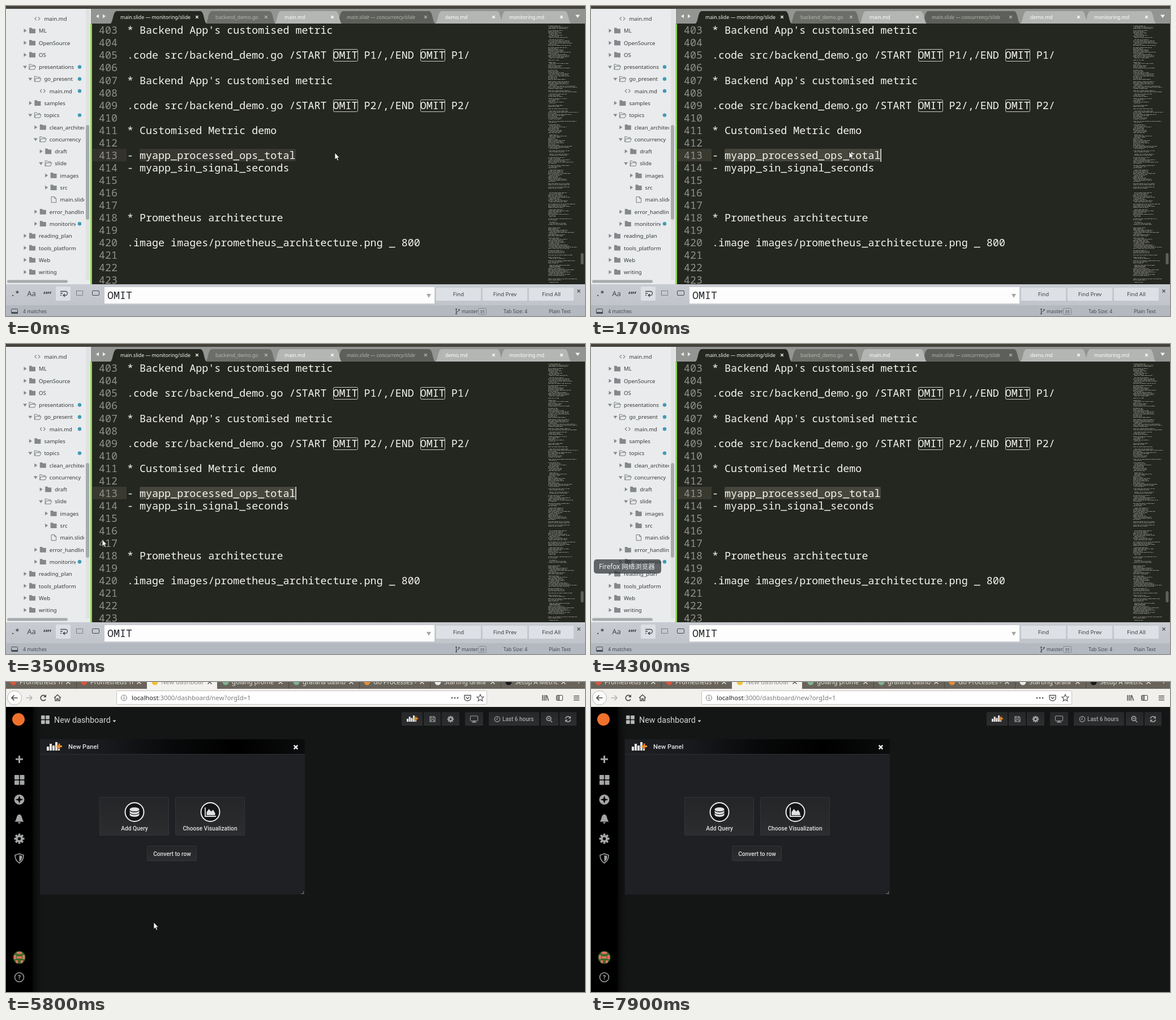
Animation, 1023 px wide and 547 px high, one loop 8 s. Source, as an HTML page with a canvas:

```html
<!DOCTYPE html>
<html lang="en">
<head>
<meta charset="utf-8">
<title>Editor to dashboard</title>
<style>
  html, body { margin: 0; width: 100%; height: 100%; overflow: hidden; background: #242620; }
  canvas { display: block; }
</style>
</head>
<body>
<canvas id="stage" width="1023" height="547"></canvas>
<script>
const g = document.getElementById('stage').getContext('2d');
const LOOP = 8000, SWITCH = 4400;
const UI = '"Noto Sans", sans-serif', WEB = 'Roboto, sans-serif';
const CODE = '18.37px "Noto Sans Mono", monospace';
const CHAR = 11.02, ROW = 22.05, TEXT_X = 214;

// ---- drawing helpers ----
function text(s, x, y, font, color, align = 'left') {
  g.font = font; g.fillStyle = color; g.textAlign = align;
  g.fillText(s, x, y);
}
function rect(x, y, w, h, color) { g.fillStyle = color; g.fillRect(x, y, w, h); }
function shape(d, x, y, fill, stroke, width = 1) {
  g.save(); g.translate(x, y);
  const p = new Path2D(d);
  if (fill) { g.fillStyle = fill; g.fill(p); }
  if (stroke) { g.strokeStyle = stroke; g.lineWidth = width; g.stroke(p); }
  g.restore();
}
function box(x, y, w, h, r, fill, stroke) {
  g.beginPath(); g.roundRect(x, y, w, h, r);
  if (fill) { g.fillStyle = fill; g.fill(); }
  if (stroke) { g.strokeStyle = stroke; g.lineWidth = 1; g.stroke(); }
}
function disc(x, y, r, fill, stroke, width = 1) {
  g.beginPath(); g.arc(x, y, r, 0, 7);
  if (fill) { g.fillStyle = fill; g.fill(); }
  if (stroke) { g.strokeStyle = stroke; g.lineWidth = width; g.stroke(); }
}
function cross(x, y, r, color, width = 1.3) {
  shape(`M${-r} ${-r}L${r} ${r}M${-r} ${r}L${r} ${-r}`, x, y, null, color, width);
}
function gradient(x0, y0, x1, y1, ...colors) {
  const f = g.createLinearGradient(x0, y0, x1, y1);
  colors.forEach((c, i) => f.addColorStop(i / (colors.length - 1), c));
  return f;
}
function randomFrom(seed) {
  return () => (seed = seed * 16807 % 2147483647) / 2147483647;
}

// ---- editor ----
// kind, depth, label, modified: "+" open folder, ">" closed folder, "c" code file, "f" plain file
const tree = [
  'c1 main.md', '>0 ML', '>0 OpenSource', '>0 OS', '+0 presentations *', '+1 go_present *',
  'c2 main.md *', '>1 samples', '+1 topics *', '>2 clean_architecture', '+2 concurrency',
  '>3 draft', '+3 slide', '>4 images', '>4 src', 'f4 main.slide', '>2 error_handling',
  '>2 monitoring *', '>0 reading_plan', '>0 tools_platform', '>0 Web', '>0 writing'
];
const code = [
  "* Backend App's customised metric", '',
  '.code src/backend_demo.go /START OMIT P1/,/END OMIT P1/', '',
  "* Backend App's customised metric", '',
  '.code src/backend_demo.go /START OMIT P2/,/END OMIT P2/', '',
  '* Customised Metric demo', '',
  '- myapp_processed_ops_total', '- myapp_sin_signal_seconds', '', '', '',
  '* Prometheus architecture', '',
  '.image images/prometheus_architecture.png _ 800', '', '', ''
];
// left, right, label, label x, fill, text colour, italic
const tabs = [
  [870, 1000, 'monitoring.md', 889, '#b3b6b3', '#fff'],
  [757, 880, 'demo.md', 776, '#b3b6b3', '#fff'],
  [583, 760, 'main.slide — concurrency/slide', 602, '#5d5f5a', '#b0b2ac', true],
  [473, 595, 'main.md', 492, '#b3b6b3', '#fff'],
  [351, 478, 'backend_demo.go', 370, '#6c6e69', '#b5b7b1'],
  [183, 356, 'main.slide — monitoring/slide', 202, '#242620', '#f4f4f0']
];

function drawSidebar() {
  rect(0, 5, 152, 486, '#e9ebec');
  tree.forEach((entry, i) => {
    const kind = entry[0], [, label, modified] = entry.split(' ');
    const x = 58 + 9.4 * entry[1], y = 22.3 + 21.29 * i;
    if (kind === '>') shape('M-2-3.5L3 0L-2 3.5Z', x - 24.5, y, '#85898c');
    if (kind === '+') shape('M-3.5-2L3.5-2L0 3Z', x - 24.5, y, '#85898c');
    if (kind === '>') shape('M0-5h4l1.5 1.7h5.5v8H0Z', x - 17, y, '#85888b');
    if (kind === '+') shape('M.5 4.5V-4.5H4L5.5-3H10V-1M.5 4.5L2.5-1H12L10 4.5Z', x - 17.5, y, null, '#777b7e');
    if (kind === 'c') shape('M4-3L1 0L4 3M7-3L10 0L7 3', x - 17.5, y, null, '#85888b', 1.2);
    if (kind === 'f') shape('M.5-5H6L9-2V5H.5ZM6-5V-2H9', x - 16, y, null, '#777b7e');
    g.save();
    g.beginPath(); g.rect(0, 0, modified ? 123 : 138, 491); g.clip();
    text(label, x, y + 3.7, '9.6px ' + UI, '#373b3e');
    g.restore();
    if (modified) disc(130, y, 3.2, '#3e9bb5');
  });
  rect(141, 5, 7, 479, '#dfe1e2');
  box(141, 210, 6, 167, 3, '#a7abad');
  box(2, 483.5, 107, 5, 2.5, '#a7abad');
  rect(149, 31, 3, 460, '#8fdb4a');
}

function drawTabs() {
  rect(0, 0, 1023, 5, '#45423c');
  rect(150, 5, 873, 27, '#929592');
  shape('M2-3.5L-3 0L2 3.5Z', 162, 18, '#eceeec');
  shape('M-2-3.5L3 0L-2 3.5Z', 173, 18, '#eceeec');
  for (const [l, r, label, x, fill, color, italic] of tabs) {
    shape(`M${l} 32C${l + 7} 31 ${l + 5} 9 ${l + 13} 9H${r - 13}C${r - 5} 9 ${r - 7} 31 ${r} 32Z`, 0, 0, fill);
    text(label, x, 23.3, (italic ? 'italic ' : '') + '8.75px ' + UI, color);
    cross(r - 18.5, 19.5, 2.3, color);
  }
  rect(152, 31, 871, 1, '#242620');
  shape('M-4-2.5H4L0 3Z', 1010, 18, '#f1f2f1');
}

function drawMinimap(selected) {
  const rand = randomFrom(4207);
  g.fillStyle = 'rgba(216,218,206,.55)';
  for (let y = 33; y < 490; y += 2) {
    if (rand() < .17) continue;
    const isLong = rand() < .16, indent = rand() < .3 ? 2 : 0;
    const end = 958 + (isLong ? 36 + rand() * 17 : 12 + rand() * 27);
    for (let x = 958 + indent; x < end;) {
      const w = Math.min(1 + rand() * 6, end - x);
      g.fillRect(x, y, w, 1);
      x += w + 1;
    }
  }
  if (selected) rect(960, 460, 20, 2, 'rgba(110,109,94,.6)');
  box(1015.5, 436, 5, 20, 2.5, '#5e605a');
}

function drawCode(s) {
  const dim = s.time < 300;
  rect(152, 31, 871, 460, '#242620');
  rect(153, 252, 60, 22, dim ? '#33332b' : '#3a392f');
  if (s.selected) box(236, 252, 276, 22, 2, dim ? '#383831' : '#47463c');
  code.forEach((line, i) => {
    const y = 49.3 + ROW * i;
    text(403 + i, 164, y, CODE, '#8f908a');
    text(line, TEXT_X, y, CODE, '#f5f5ee');
    for (const m of line.matchAll(/OMIT/g))
      box(Math.round(TEXT_X + m.index * CHAR) + .5, Math.round(y - 17) + .5, 43, 21, 2, null, '#c9cac1');
  });
  if (s.caret) rect(s.caret, 252, 1.4, 23, '#f8f8f0');
  drawMinimap(s.selected);
}

function drawFindBar() {
  const ink = '#43484d';
  rect(0, 491, 1023, 37, gradient(0, 491, 0, 528, '#c8ccd2', '#c1c5cb'));
  box(88, 495, 26, 25, 2, '#dce0e4');
  text('.*', 16, 512, 'bold 13px "Noto Sans Mono", monospace', ink, 'center');
  text('Aa', 45, 512, '13px ' + UI, ink, 'center');
  text('“”', 73, 516, 'bold 16px ' + UI, ink, 'center');
  shape('M-6-3.5H3A3.5 3.5 0 0 1 3 3.5H-1M-6 0H-2M-6 3.5H-4M2 1L-1 3.5L2 6', 102, 507, null, ink, 1.3);
  g.setLineDash([2, 1.5]);
  g.strokeStyle = ink; g.lineWidth = 1; g.strokeRect(124.5, 502.5, 11, 8);
  g.setLineDash([]);
  box(152.5, 502.5, 12, 8, 1.5, null, ink);
  rect(174, 496, 583, 29, '#fdfdfd');
  text('OMIT', 179, 517, CODE, '#22252a');
  shape('M-4-3H4L0 4Z', 747, 511, '#a4a7aa');
  ['Find', 'Find Prev', 'Find All'].forEach((label, i) => {
    box(760 + 82 * i, 497, 79, 23, 1, '#dde0e4');
    text(label, 799.5 + 82 * i, 512, '9.6px ' + UI, '#3b4045', 'center');
  });
  cross(1012, 503, 2.5, '#4c5156');
  rect(0, 528, 1023, 19, '#b4b9c1');
  const small = '8.7px ' + UI, color = '#454a51';
  box(9.5, 534.5, 11, 8, 1, null, color);
  rect(10, 540, 11, 3, color);
  text('4 matches', 30, 542, small, color);
  shape('M-2.5-3V4M2.5-2C2.5 1-2.5 0-2.5 3', 798, 538.5, null, color);
  [[795.5, 535], [800.5, 536], [795.5, 543]].forEach(([x, y]) => disc(x, y, 1.3, color));
  text('master', 805, 542, small, color);
  box(834.5, 533.5, 14, 11, 2, null, '#858a91');
  text('35', 841.5, 541.5, '7px ' + UI, color, 'center');
  text('Tab Size: 4', 879, 542, small, color);
  text('Plain Text', 959, 542, small, color);
}

function drawEditor(s) {
  drawCode(s);
  drawSidebar();
  drawTabs();
  drawFindBar();
}

// ---- browser ----
const pages = [
  ['Prometheus Ti', '#e0523a'], ['Prometheus Ti', '#e0523a'], ['New dashboar', '#f2c230'],
  ['golang prome', '#7fb08f'], ['grafana dashb', '#7fb08f'], ['Go Processes -', '#e98a35'],
  ['Starting Grafa', '#e9e9e6'], ['Setup A Metric', '#171717']
];

function drawBrowserBar() {
  const ink = '#4c4c4b';
  rect(0, 0, 1023, 12, '#68645b');
  pages.forEach(([title, color], i) => {
    const x = -1 + 125 * i, active = i === 2;
    if (active) rect(249, 0, 124, 13, '#f3f2ef');
    else if (i !== 3) rect(x, 0, 1, 12, '#4a473f');
    g.save();
    g.beginPath(); g.rect(0, 0, x + 101, 12); g.clip();
    disc(x + 14, 0, 5.5, color);
    text(title, x + 25, 3.7, '11.2px ' + UI, active ? '#8d8b84' : '#e7e4dc');
    g.restore();
    cross(x + 111, 0, 3.5, active ? ink : '#e7e4dc', 1.4);
  });
  text('+', 1012, 4, '13px ' + UI, '#e7e4dc', 'center');
  rect(0, 12, 1023, 32, '#f1f0ed');
  disc(15, 28, 12.5, '#fbfbfa', '#b9b8b5');
  shape('M5.5 0H-5M-.5-4.5L-5 0L-.5 4.5', 15, 28, null, ink, 1.7);
  shape('M-5.5 0H5M.5-4.5L5 0L.5 4.5', 41, 28, null, '#b5b4b1', 1.6);
  shape('M4 2.5A4.7 4.7 0 1 1 3-3.5', 66, 28, null, ink, 1.7);
  shape('M5-6V-1H0Z', 66, 28, ink);
  shape('M-6 0L0-5.5L6 0M-4-1V5H-1.2V1.5H1.2V5H4V-1', 91, 28, null, ink, 1.5);
  box(195.5, 15.5, 654, 24, 2, '#fff', '#c6c4bf');
  disc(208.5, 28, 5, null, '#757575');
  rect(208, 27, 1.2, 4, '#757575'); rect(208, 25, 1.2, 1.2, '#757575');
  const font = '11.25px ' + UI;
  text('localhost', 222, 32, font, '#222');
  const hostWidth = g.measureText('localhost').width;
  text(':3000/dashboard/new?orgId=1', 222 + hostWidth, 32, font, '#7b7b7b');
  [788, 793, 798].forEach(x => disc(x, 28, 1.5, '#666'));
  shape('M-5.5-4.5H5.5V0C5.5 7-5.5 7-5.5 0ZM-3-1.5L0 1.5L3-1.5', 815.5, 28, null, '#555', 1.4);
  shape('M0-6L1.8-2L6-1.7L2.8 1.2L3.8 5.5L0 3.2L-3.8 5.5L-2.8 1.2L-6-1.7L-1.8-2Z', 838, 28, null, '#555', 1.2);
  shape('M-5-5V5M-2-5V5M1-5V5M2.5-4.5L5.5 5', 953, 28, null, ink, 1.5);
  box(972.5, 23.5, 11, 9, 1.5, null, ink);
  rect(973, 24, 4, 8, '#9a9a98'); rect(977, 24, 1, 9, ink);
  [24, 27.5, 31].forEach(y => rect(1003, y, 10, 1.4, ink));
}

function gear(x, y, r, color, hole) {
  disc(x, y, r * .72, color);
  for (let i = 0; i < 8; i++) {
    g.save(); g.translate(x, y); g.rotate(i * Math.PI / 4);
    rect(-r * .2, -r, r * .4, r * .5, color);
    g.restore();
  }
  disc(x, y, r * .3, hole);
}
function tiles(x, y, size, color) {
  for (const dx of [0, 1]) for (const dy of [0, 1])
    box(x + dx * (size + 1.5), y + dy * (size + 1.5), size, size, 1, color);
}
function barsWithPlus(x, y, k) {
  g.save(); g.translate(x, y); g.scale(k, k);
  [7, 12, 9, 15].forEach((h, i) => rect(i * 5, 15 - h, 4, h, '#e8e8e8'));
  rect(20, 9, 3, 6, '#e8e8e8');
  rect(17, 6, 10, 3, '#f0a020'); rect(20.5, 2.5, 3, 10, '#f08030');
  g.restore();
}

function drawNav() {
  const ink = '#a3a5a6';
  rect(0, 44, 47, 503, '#000');
  rect(47, 44, 20, 503, gradient(47, 0, 67, 0, '#070808', 'rgba(20,22,21,0)'));
  disc(22, 66, 11, '#f0712c');
  rect(17, 134.7, 13, 3, ink); rect(22, 130, 3, 13, ink);
  tiles(15, 164, 8, ink);
  disc(23.5, 207.5, 9, ink);
  shape('M0-7L1.7-1.7L7 0L1.7 1.7L0 7L-1.7 1.7L-7 0L-1.7-1.7Z', 23.5, 207.5, '#000');
  shape('M0-8C6-7 4 1 8 5H-8C-4 1-6-7 0-8ZM-2.5 6H2.5C2 9-2 9-2.5 6Z', 23.5, 241.5, ink);
  gear(23.5, 276.5, 9, ink, '#000');
  shape('M0-8L7.5-5.5C7.5 2 5 5.5 0 8.5C-5 5.5-7.5 2-7.5-5.5Z', 23.5, 311, null, ink, 1.6);
  shape('M0-5.5L5-3.8C5 1.5 3 4 0 6Z', 23.5, 311, ink);
  g.save();
  disc(23.5, 486, 11, '#3d6b2c'); g.clip();
  rect(19, 476, 9, 4, '#d9745c'); rect(14, 482, 4, 7, '#d9745c'); rect(29, 482, 4, 7, '#d9745c');
  rect(19, 484, 9, 4, '#d9745c'); rect(17, 491, 4, 6, '#d9745c'); rect(26, 491, 4, 6, '#d9745c');
  g.restore();
  disc(23.5, 521, 8, null, ink, 1.5);
  text('?', 23.5, 525, 'bold 11px ' + WEB, ink, 'center');
}

function drawToolbar(hover) {
  const ink = '#a2a4a5';
  tiles(62, 59, 6.7, '#b5b7b8');
  text('New dashboard', 85, 72, '14.3px ' + WEB, hover ? '#fff' : '#d4d5d6');
  shape('M-3-1.5H3L0 2Z', 191.5, 69, hover ? '#fff' : '#d4d5d6');
  [[699, 37], [738, 30], [770, 31], [811, 32], [853, 89], [945, 31], [978, 30]].forEach(([x, w]) =>
    box(x, 53, w, 24, 1, gradient(0, 53, 0, 77, '#262728', '#2d2e2f')));
  barsWithPlus(708, 59, .74);
  shape('M-4.5-4.5H3L4.5-3V4.5H-4.5ZM-2.5-4.5V-1.5H2V-4.5M-2.5 4.5V1H2.5V4.5', 753.5, 65.5, null, ink, 1.2);
  gear(785.5, 65.5, 5.8, ink, '#292a2b');
  box(820.5, 60, 13, 8.5, 1, null, ink);
  rect(823, 70, 8, 1.5, ink); rect(826, 68, 2, 2, ink);
  disc(868, 65.5, 4.7, null, ink, 1.2);
  shape('M0-3V.5H-2.5', 868, 65.5, null, ink);
  text('Last 6 hours', 877, 69.3, '500 10px ' + WEB, ink);
  disc(959, 64.5, 3.8, null, ink, 1.7);
  shape('M3 3L6 6M-2-.5H2', 959, 65, null, ink, 1.5);
  shape('M-4.5-1A4.6 4.6 0 0 1 3.5-3M4.5 1A4.6 4.6 0 0 1-3.5 3', 993, 65.5, null, ink, 1.6);
  shape('M5-5.5V-1H.5ZM-5 5.5V1H-.5Z', 993, 65.5, ink);
}

function drawPanel() {
  const label = '500 10.2px ' + WEB, ink = '#e0e1e2';
  rect(60, 101, 468, 274, '#1f2024');
  rect(60, 101, 468, 26, gradient(60, 101, 528, 113, '#1f2024', '#18191c', '#08090a', '#000', '#0b0c0d'));
  rect(60, 127, 468, 1, '#2d2f31');
  barsWithPlus(72, 106, 1);
  text('New Panel', 110, 118, '500 11.2px ' + WEB, ink);
  cross(512, 115, 3.3, '#f2f2f2', 2.4);
  for (const [x, y, w, h] of [[165, 203, 123, 68], [299, 203, 123, 68], [249, 289, 88, 27]])
    box(x + .5, y + .5, w - 1, h - 1, 1, gradient(0, y, 0, y + h, '#242527', '#2c2d2e'), '#323436');
  disc(227, 229.5, 16.5, '#141516', '#ececec', 2);
  disc(361, 229.5, 16.5, '#141516', '#ececec', 2);
  shape('M-8.5-4.5C-8.5-9.5 8.5-9.5 8.5-4.5C8.5 0-8.5 0-8.5-4.5Z', 227, 229.5, ink);
  for (const y of [0, 4.5]) shape('M-8.5-2.5C-6 1.5 6 1.5 8.5-2.5V.5C7 5-7 5-8.5.5Z', 227, 229.5 + y, ink);
  shape('M-9-8V7.5H10', 361, 229.5, null, ink, 1.8);
  shape('M-6.5 5.5V0L-2.5-5.5L1.5-1L5-4L8.5 2V5.5Z', 361, 229.5, ink);
  text('Add Query', 227, 261.7, label, ink, 'center');
  text('Choose Visualization', 360.5, 261.7, label, ink, 'center');
  text('Convert to row', 293.5, 306.5, label, ink, 'center');
  shape('M4 0V4H0', 521.5, 369.5, null, '#77797b', 1.2);
}

function drawBrowser(s) {
  rect(0, 44, 1023, 503, '#141615');
  drawNav();
  drawToolbar(s.hover);
  drawPanel();
  drawBrowserBar();
}

// ---- timeline ----
// time, x, y of the pointer tip
const path = [
  [0, 581, 259], [500, 581, 259], [600, 556, 268], [700, 500, 275], [800, 462, 267], [1100, 456, 257],
  [2900, 456, 257], [3200, 392, 272], [3500, 170, 345], [3800, 1, 409],
  [5000, 0, 400], [5300, 170, 420], [5500, 259, 425], [5700, 259, 425], [5800, 261, 424],
  [6000, 248, 322], [6100, 248, 322], [6300, 178, 150], [6500, 128, 66],
  [7500, 128, 66], [7700, 34, 133]
];
function pointerAt(time) {
  const i = path.findIndex(p => p[0] > time);
  if (i < 0) return path.at(-1).slice(1);
  const [t0, x0, y0] = path[i - 1], [t1, x1, y1] = path[i];
  const k = (time - t0) / (t1 - t0);
  return [x0 + (x1 - x0) * k, y0 + (y1 - y0) * k];
}
const within = (t, ...spans) => spans.some(([a, b]) => t >= a && t < b);

function stateAt(time) {
  const atWordEnd = within(time, [300, 1100], [1700, 2100], [2500, 2800], [3300, 3900]);
  return {
    time,
    selected: within(time, [0, 300], [1700, 2400], [2500, SWITCH]),
    caret: atWordEnd ? 511.5 : within(time, [1300, 1700], [2400, 2500]) ? 456.5 : 0,
    hover: within(time, [6500, 7600]),
    pointer: within(time, [0, 3900], [5100, 7900]),
    tooltip: time === 4200 ? .5 : within(time, [4300, 5100]) ? 1 : within(time, [5100, 5300]) ? (5300 - time) / 300 : 0
  };
}

function drawPointer(s) {
  const [x, y] = pointerAt(s.time);
  if (within(s.time, [600, 1300])) {
    shape('M-2.5-5.5H2.5M0-5.5V5.5M-2.5 5.5H2.5', x, y, null, '#111', 2.5);
    shape('M-2.5-5.5H2.5M0-5.5V5.5M-2.5 5.5H2.5', x, y, null, '#fff');
  } else if (s.hover) {
    shape('M0 0C2-1 2.5 0 2.5 5L8 6.5C9 8 8 12 7 14H1L-3.5 8C-3 6.5-1.5 7-.5 8.5Z', x, y, '#fff', '#111');
  } else {
    shape('M0 0V12L2.8 9.5L4.7 14L6.7 13L4.8 8.8H8.3Z', x, y, '#fff', '#111', .8);
  }
}

function drawTooltip(alpha) {
  g.save();
  g.globalAlpha = alpha;
  box(5, 380, 119, 25, 5, 'rgba(40,44,48,.7)');
  text('Firefox 网络浏览器', 14, 397, '11.7px "Noto Sans", "Noto Sans CJK SC", sans-serif', '#f0f1f1');
  g.restore();
}

function frame(now) {
  const time = Math.floor(now % LOOP / 100) * 100;
  const s = stateAt(time);
  (time < SWITCH ? drawEditor : drawBrowser)(s);
  if (s.tooltip) drawTooltip(s.tooltip);
  if (s.pointer) drawPointer(s);
  requestAnimationFrame(frame);
}
requestAnimationFrame(frame);
</script>
</body>
</html>
```
